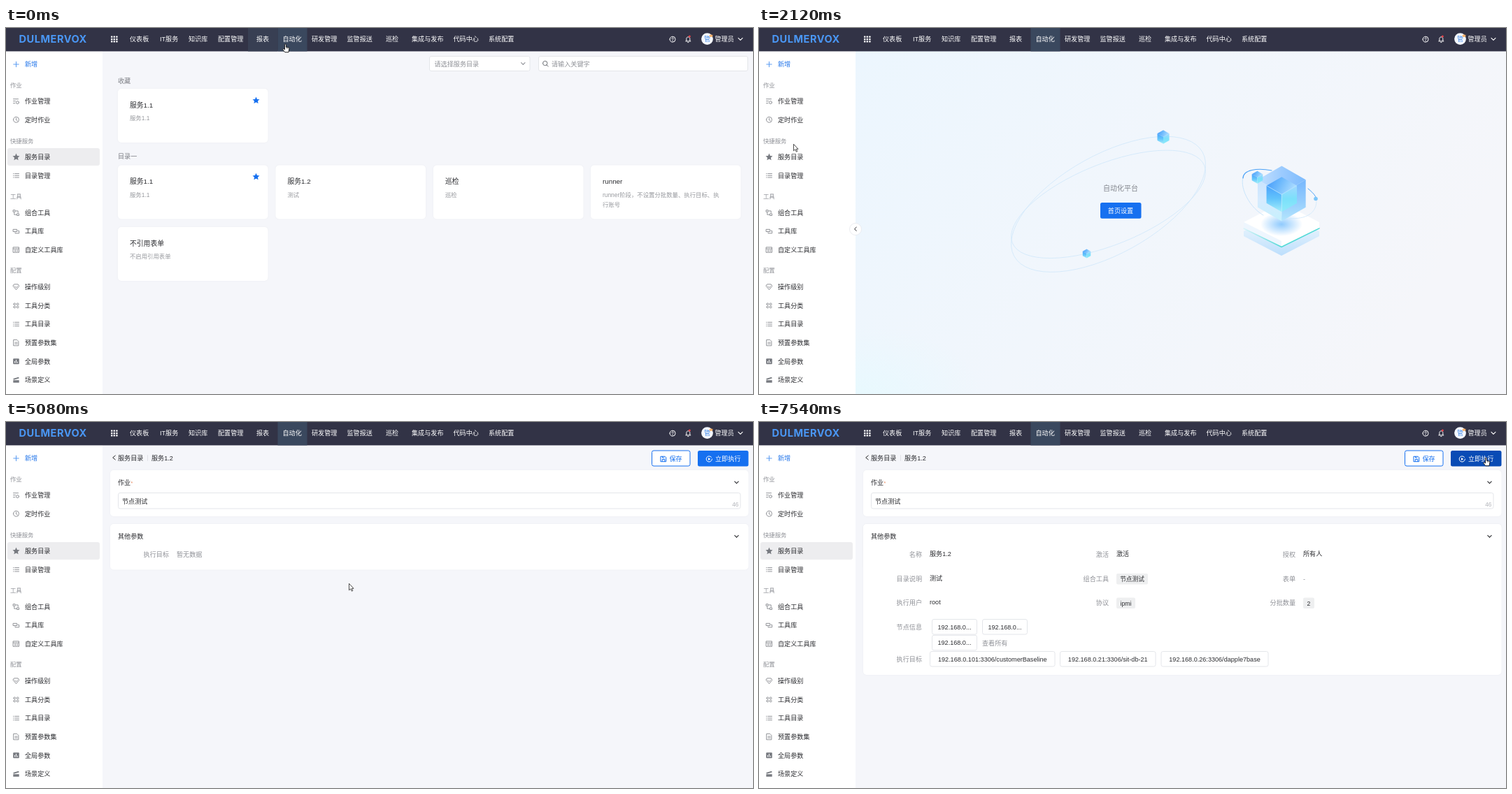
Write an HTML page that moves like this. It is 1068 px wide and 524 px high and loops after 8000 ms.

```html
<!DOCTYPE html>
<html>
<head>
<meta charset="utf-8">
<title>Service catalog</title>
<style>
html, body { margin: 0; width: 100%; height: 100%; overflow: hidden; background: #f5f6fa; }
svg { display: block; width: 100%; height: 100%; }
text { font-family: "Liberation Sans", "Noto Sans CJK SC", "Noto Sans CJK", sans-serif; white-space: pre; }
.brand { font-family: Inter, sans-serif; font-weight: 700; letter-spacing: .5px; }
.line { fill: none; stroke-linecap: round; stroke-linejoin: round; }
.card { fill: #fff; filter: drop-shadow(0 0 1px #0000000a); }

.t { animation: 8s step-end infinite; }
.nav { animation-name: nav; animation-timing-function: linear; }
.home { animation-name: home; }
.selected { animation-name: selected; }
.row1 { animation-name: row1; }
.row2 { animation-name: row2; }
.fold { animation-name: fold; }
.catalog { animation-name: catalog; }
.fav { animation-name: fav; }
.job { animation-name: job; }
.body { animation-name: body; }
.empty { animation-name: empty; }
.fields { animation-name: fields; }
.targets { animation-name: targets; }
.run { animation-name: run; }
.cursor { animation-name: cursor; }
.hand { animation-name: hand; }
.arrow { animation-name: arrow; }

@keyframes nav { 0%, .87% { opacity: 1 } 3%, 100% { opacity: 0 } }
@keyframes home { 0%, 35.87% { opacity: 0 } 1.75% { opacity: 1 } }
@keyframes selected { 0%, 35.87% { opacity: 1 } 1.75% { opacity: 0 } 27.45% { opacity: .6 } }
@keyframes row1 { 0%, 24.5% { opacity: 0 } 21.67% { opacity: .6 } }
@keyframes row2 { 0%, 25.5% { opacity: 0 } 24.5% { opacity: .6 } }
@keyframes fold { 0%, 50.6% { opacity: 0 } 20.72% { opacity: 1 } }
@keyframes catalog { 0%, 38% { opacity: 1 } 1.75%, 59.5% { opacity: 0 } }
@keyframes fav { 0% { opacity: 0 } 56.4% { opacity: 1 } }
@keyframes job { 0% { opacity: 0 } 59.5% { opacity: 1 } }
@keyframes body { 0% { opacity: 0 } 61.37% { opacity: 1 } }
@keyframes empty { 0%, 66.37% { opacity: 0 } 61.37% { opacity: 1 } }
@keyframes fields { 0% { opacity: 0 } 66.37% { opacity: 1 } }
@keyframes targets { 0% { opacity: 0 } 67.37% { opacity: 1 } }
@keyframes run { 0% { fill: #1670f0 } 86.7% { fill: #0f5fd7 } 92.5% { fill: #0b54c6 } 94.2% { fill: #094bb5 } }
@keyframes hand { 0%, 21.67%, 27.45%, 86.7% { opacity: 1 } 15%, 25.5%, 59.5% { opacity: 0 } }
@keyframes arrow { 0%, 21.67%, 27.45%, 86.7% { opacity: 0 } 15%, 25.5%, 59.5% { opacity: 1 } }
@keyframes cursor {
  0% { transform: translate(399px, 23px) }
  13.12% { transform: translate(399px, 23px); animation-timing-function: steps(4, jump-start) }
  16.92% { transform: translate(262px, 42px); animation-timing-function: steps(7, jump-start) }
  23.55% { transform: translate(71px, 100px); animation-timing-function: steps(4, jump-start) }
  27.45% { transform: translate(49px, 166px); animation-timing-function: steps(4, jump-start) }
  31.3% { transform: translate(43px, 186px) }
  48.75% { transform: translate(43px, 186px); animation-timing-function: steps(3, jump-start) }
  51.64% { transform: translate(150px, 190px); animation-timing-function: steps(5, jump-start) }
  56.45% { transform: translate(400px, 222px); animation-timing-function: steps(3, jump-start) }
  59.34% { transform: translate(490px, 231px) }
  76.98% { transform: translate(490px, 231px); animation-timing-function: steps(1, jump-start) }
  77.97% { transform: translate(511px, 215px); animation-timing-function: steps(3, jump-start) }
  80.9% { transform: translate(650px, 152px); animation-timing-function: steps(4, jump-start) }
  84.8% { transform: translate(905px, 82px); animation-timing-function: steps(3, jump-start) }
  87.6% { transform: translate(1039px, 49px) }
  87.62%, 100% { transform: translate(1039px, 51px) }
}
</style>
</head>
<body>
<script>
const DARK = '#2c2d31', GREY = '#8f9197', BLUE = '#1670f0';
const STAR = 'M0-5L1.5-1.6 5-1.3 2.4 1.1 3.1 4.6 0 2.8-3.1 4.6-2.4 1.1-5-1.3-1.5-1.6Z';

// y is the middle of the text line
const text = (x, y, s, fill = DARK, size = 9.1, anchor = 'start') =>
  `<text x="${x}" y="${(y + size * .365).toFixed(2)}" fill="${fill}" font-size="${size}" text-anchor="${anchor}">${s}</text>`;
const rect = (x, y, w, h, r, attrs) =>
  `<rect x="${x}" y="${y}" width="${w}" height="${h}" rx="${r}" ${attrs}/>`;
const card = (x, y, w, h) => rect(x, y, w, h, 5, 'class="card"');
const box = (x, y, w, h) => rect(x + .5, y + .5, w - 1, h - 1, 2.5, 'fill="#fff" stroke="#e4e6ea"');
const line = (x, y, d, stroke, width = 1) =>
  `<path class="line" transform="translate(${x} ${y})" d="${d}" stroke="${stroke}" stroke-width="${width}"/>`;
const shape = (x, y, d, fill) => `<path transform="translate(${x} ${y})" d="${d}" fill="${fill}"/>`;
const group = (name, ...parts) => `<g class="t ${name}">${parts.join('')}</g>`;
const down = (x, y, stroke, r = 2.7) => line(x, y, `M${-r}${-r / 2}L0 ${r / 2}L${r}${-r / 2}`, stroke, 1.1);
const ring = r => `M${-r} 0a${r} ${r} 0 1 1 ${2 * r} 0a${r} ${r} 0 1 1 ${-2 * r} 0`;
const cube = (x, y, r, look = '') => `<g transform="translate(${x} ${y}) scale(${r})">
  <path d="M0-1L.87-.5 0 0-.87-.5Z" fill="url(#${look}top)"/>
  <path d="M-.87-.5L0 0V1L-.87 .5Z" fill="url(#${look}left)"/>
  <path d="M.87-.5L0 0V1L.87 .5Z" fill="url(#${look}right)"/></g>`;

function header() {
  const menu = [[177, '仪表板'], [220, 'IT服务'], [261, '知识库'], [303, '配置管理'], [358, '报表'], [395.5, '自动化'],
    [437, '研发管理'], [487.5, '监管报送'], [543, '巡检'], [580, '集成与发布'], [639.5, '代码中心'], [690, '系统配置']];
  let dots = '';
  for (let i = 0; i < 9; i++) dots += rect(150 + i % 3 * 3.6, 11.5 + (i / 3 | 0) * 3.4, 2.4, 2.3, .3, 'fill="#fff"');
  return rect(0, 0, 1068, 33.4, 0, 'fill="#323346"') +
    group('nav', rect(346, 0, 42, 33.4, 0, 'fill="#383f53"')) +
    rect(388.5, 0, 42, 33.4, 0, 'fill="#3a485e"') +
    '<text class="brand" x="18.5" y="21" font-size="14.6" fill="#4a97f5">DULMERVOX</text>' + dots +
    menu.map(([x, s]) => text(x, 16, s, '#fff')).join('') +
    line(953, 16.2, ring(4) + 'M-1.3-.9C-1.3-2.7 1.4-2.5 1.3-.9C1.2-.1 0-.1 0 .9M0 2.2v.1', '#fff') +
    line(975.3, 16.3, 'M-3.5 2.6h7M-2.5 2.4V-.8C-2.5-4.3 2.5-4.3 2.5-.8V2.4M-.6 4.3h1.2', '#fff') +
    '<circle cx="977.3" cy="12" r="1.6" fill="#e8454c"/><circle cx="1002.5" cy="15.6" r="8.4" fill="#f4f8ff"/>' +
    text(1002.5, 15.8, '管', '#4b8fe8', 9.1, 'middle') +
    shape(1008, 11, 'M-2.6-1.6L-1-.7 0-2.4 1-.7 2.6-1.6 2 1.8H-2Z', '#f5b06a') +
    text(1013.5, 16, '管理员', '#fff') + down(1050, 15.8, '#fff', 3);
}

function sidebar() {
  const list = 'M-4-2.7h.5M-4 0h.5M-4 2.7h.5M-1.8-2.7H4M-1.8 0H4M-1.8 2.7H4';
  const items = [
    [105, '作业管理', 'M-4-3.3H3M-4-.4h3M-4 2.6h2.4M4 1.6a2 2 0 1 1-4 0a2 2 0 1 1 4 0'],
    [131.3, '定时作业', ring(4) + 'M0-2.2V.3L1.6 1.4'],
    [184.6, '服务目录'],
    [211.3, '目录管理', list],
    [264.5, '组合工具', 'M-4-3.8h2.6v2.6H-4ZM1.5 1.4h2.6V4H1.5ZM-.2-2.6H2.7V0M-2.7 0v2.7H.2'],
    [291, '工具库', 'M-4-2.7h5.2V.5H-4ZM-1.5 1.9v1h5.7V-.6H2.5'],
    [317.6, '自定义工具库', 'M-4-3.7h8v7.4h-8ZM-4-1.5h8M-2 .3h1.3M-2 1.9h1.3M1.2.3h1M1.2 1.9h1'],
    [370.7, '操作级别', 'M-2.6-3.8h5.2L4.3-1.2 0 4-4.3-1.2ZM-2-1L0 1.2 2-1'],
    [397.4, '工具分类', [[-2.2, -2.1], [2.2, -2.1], [-2.2, 2.1], [2.2, 2.1]]
      .map(([x, y]) => `M${x - 1.4} ${y}a1.4 1.4 0 1 1 2.8 0a1.4 1.4 0 1 1-2.8 0`).join('')],
    [424, '工具目录', list],
    [450.6, '预置参数集', 'M-3.4-4.2H1.2L3.4-2V4.2H-3.4ZM-1.7-.5h3.4M-1.7 1.6h3.4'],
    [477.3, '全局参数'],
    [503.7, '场景定义']];
  const labels = [[82, '作业'], [161.5, '快捷服务'], [241, '工具'], [347.3, '配置']];
  const row = y => rect(2, y, 132, 25, 3, 'fill="#ededef"');
  return rect(0, 33, 138, 491, 0, 'fill="#fff"') +
    group('selected', row(172)) + group('row1', row(92.5)) + group('row2', row(119)) +
    line(14.5, 52, 'M-3.7 0h7.4M0-3.7v7.4', '#5a9bf2') + text(27, 52, '新增', '#2476ea') +
    labels.map(([y, s]) => text(6, y, s, GREY, 8.4)).join('') +
    items.map(([y, s, d]) => text(27, y, s) + (d ? line(14.5, y, d, '#85878d', .9) : '')).join('') +
    shape(14.5, 184.6, STAR, '#777a80') +
    rect(10.2, 473.3, 8.6, 8, 1, 'fill="#777a80"') + line(14.5, 477.3, 'M-2 1.9V0M0 1.9V-2M2 1.9V.8', '#fff') +
    shape(14.5, 503.7, 'M-4.2-1.8L3.6-4 4.2-2.2-3.6 0ZM-4.2.5h8.4v3.6h-8.4Z', '#777a80');
}

function home() {
  const orbit = (a, b, r) =>
    `<ellipse rx="${a}" ry="${b}" transform="translate(499.5 252.3) rotate(${-r})" fill="none" stroke="#d3e9fb" stroke-width=".8"/>`;
  return group('home',
    rect(138, 33, 930, 491, 0, 'fill="url(#sky)"'), rect(138, 33, 930, 491, 0, 'fill="url(#mint)"'),
    orbit(153.9, 71, 29), orbit(148, 58, 22),
    cube(578, 156, 9.8), cube(468.5, 323, 6.6),
    text(517, 229, '自动化平台', '#84878e', 10, 'middle'),
    rect(488, 250, 58.5, 22.8, 2.5, `fill="${BLUE}"`), text(517, 261.5, '首页设置', '#fff', 9.1, 'middle'),
    // pedestal
    shape(747, 298, 'M-54-7L0-35 54-7V0L0 28-54 0Z', 'url(#base)'),
    shape(747, 286, 'M-54-8L0-36 54-8V1L0 28-54 1Z', '#fff'),
    shape(747, 286, 'M-54-8V1L0 28V19Z', '#eef6fe'),
    line(747, 286, 'M-54 1L0 27.5 54 .8', 'url(#edge)', 1.5),
    '<ellipse cx="747" cy="281" rx="30" ry="17" fill="url(#glow)"/>',
    // ring and cubes
    line(747, 238, 'M-26 30C-50 16-63-18-52-30', '#c4e2fb', .9),
    line(747, 238, 'M-55-23C-55-35-35-38-14-34', '#4da3f7', 1.2),
    line(747, 238, 'M38-8C44-3 48 1 50 6', '#4da3f7', 1),
    line(747, 238, 'M50 10C50 30 30 37 8 34', '#d0e9fc', .8),
    cube(747.3, 237, 39.5, 'shell-'),
    cube(747.3, 238.3, 25),
    line(747.3, 238.3, 'M-21-12.3L0 0 21-12.3M0 0V24', '#c9f0ff', .6),
    cube(712.5, 213.7, 9),
    '<circle cx="796" cy="244.5" r="2.8" fill="#7cc6fa"/>');
}

function catalog() {
  const cards = [[160, 87, '服务1.1', '服务1.1'], [160, 196.5, '服务1.1', '服务1.1'], [385.5, 196.5, '服务1.2', '测试'],
    [611, 196.5, '巡检', '巡检'], [836, 196.5, 'runner', 'runner阶段，不设置分批数量、执行目标、执'],
    [160, 285, '不引用表单', '不启用引用表单']];
  return group('catalog',
    box(605, 40, 144.5, 22), text(612.5, 51.3, '请选择服务目录', GREY), down(739.3, 51, GREY),
    box(761, 40, 300, 22), line(770.7, 50.5, ring(3.2) + 'M2.4 2.4L4.6 4.6', '#6d7076'), text(780, 51.3, '请输入关键字', GREY),
    text(160, 75.3, '收藏', '#7b7d83'), text(160, 183.5, '目录一', '#7b7d83'),
    ...cards.map(([x, y, title, note]) => card(x, y, 214.5, 77) +
      text(x + 17, y + 23.3, title, DARK, 9.8) + text(x + 17, y + 42.2, note, '#97999e', 8.4)),
    text(853, 252.7, '行账号', '#97999e', 8.4),
    shape(357.5, 103.5, STAR, BLUE), shape(357.5, 212.7, STAR, BLUE),
    group('fav', line(583, 212.7, STAR, GREY, .9)));
}

function job() {
  const label = (x, y, s) => text(x, y, s, GREY, 9.1, 'end');
  const tag = (x, y, w, s) => rect(x, y, w, 15.5, 2, 'fill="#eeeff0"') + text(x + w / 2, y + 8, s, DARK, 8.7, 'middle');
  const chip = (x, y, w, s) => box(x, y, w, 22.5) + text(x + w / 2, y + 11.2, s, DARK, 9.1, 'middle');
  const node = (x, y) => chip(x, y, 65, '192.168.0...');
  return group('job',
    line(154.5, 51, 'M1.8-3L-1.8 0 1.8 3', DARK), text(160, 51.5, '服务目录'),
    line(202.5, 51.5, 'M0-4V4', '#dcdee2', .8), text(208, 51.5, '服务1.2'),
    rect(923.5, 41, 54.5, 22, 2.5, `fill="#fff" stroke="${BLUE}"`),
    line(940, 53, 'M-3.7-3.7H2.2L3.7-2.2V3.7H-3.7ZM-1.8 3.5V.5H1.8V3.5M-1.5-3.5V-1.8H1', BLUE),
    text(948.5, 52.3, '保存', BLUE),
    rect(989, 41, 72.5, 22.5, 2.5, 'class="t run"'),
    line(1005.3, 53, 'M3.2-2.6A4.1 4.1 0 1 0 4.1 0', '#fff'), shape(1005.3, 53, 'M-1.3-2L2 0-1.3 2Z', '#fff'),
    text(1014, 52.3, '立即执行', '#fff'),
    card(149, 69, 912.5, 66), card(149, 146, 912.5, 65.5),
    group('body',
      text(160, 86.2, '作业'), text(178.6, 87.2, '*', '#e8855a', 7),
      down(1044.5, 86.5, DARK), box(160, 101, 890.5, 23.5),
      text(166, 113.3, '节点测试'), text(1047.5, 117.7, '46', '#b4b6bb', 8.4, 'end')),
    group('empty', label(233, 190, '执行目标'), text(244, 190, '暂无数据', GREY)),
    group('fields',
      card(149, 146, 912.5, 216),
      label(233, 190, '名称'), text(244, 189, '服务1.2'),
      label(500, 190, '激活'), text(511, 189, '激活'),
      label(767, 190, '授权'), text(778, 189, '所有人'),
      label(233, 224.3, '目录说明'), text(244, 223.5, '测试'),
      label(500, 224.3, '组合工具'), tag(511, 217, 45, '节点测试'),
      label(767, 224.3, '表单'), text(778, 225, '-', GREY),
      label(233, 259, '执行用户'), text(244, 258, 'root'),
      label(500, 259, '协议'), tag(511, 251.5, 27, 'ipmi'),
      label(767, 259, '分批数量'), tag(778, 251.5, 16, '2')),
    group('targets',
      label(233, 293.7, '节点信息'), node(247, 282), node(319, 282), node(247, 304.8),
      text(319, 316.5, '查看所有', GREY), label(233, 340, '执行目标'),
      chip(244, 328, 179.5, '192.168.0.101:3306/customerBaseline'),
      chip(430, 328, 137.5, '192.168.0.21:3306/sit-db-21'),
      chip(574.5, 328, 154, '192.168.0.26:3306/dapple7base')),
    group('body', text(160, 163.7, '其他参数'), down(1044.5, 163.7, DARK)));
}

const fold = () => group('fold',
  '<circle cx="138" cy="288" r="8.5" fill="#fff" stroke="#e6e8ec" stroke-width=".8"/>',
  line(138, 287.8, 'M1.3-2.6L-1.5 0 1.3 2.6', DARK));

const cursor = () => group('cursor',
  group('arrow', '<path d="M.5.3V9.8L2.8 7.8 4.3 11.2 5.8 10.5 4.3 7.3H7Z" fill="#fff" stroke="#222" stroke-width=".8"/>'),
  group('hand', `<path d="M-.5 1C-.5-.2 1.4-.2 1.4 1V4.3L4.8 5C5.7 5.2 6 5.7 5.9 6.6L5 11.7H-.2L-3 8.2
    C-3.8 7.2-2.6 6.2-1.6 7L-.5 8Z" fill="#fff" stroke="#111" stroke-width=".9" stroke-linejoin="round"/>
    <path d="M2.3 5V6.8M3.9 5.3V6.9" stroke="#111" stroke-width=".5"/>`));

const gradient = (id, dir, ...stops) => `<linearGradient id="${id}" ${dir}>` +
  stops.map((c, i) => `<stop offset="${i / (stops.length - 1)}" stop-color="${c}"/>`).join('') + '</linearGradient>';
const radial = (id, pos, color) => `<radialGradient id="${id}" ${pos}><stop stop-color="${color}"/>
  <stop offset="1" stop-color="${color}" stop-opacity="0"/></radialGradient>`;
const vertical = 'x2="0" y2="1"';

document.body.innerHTML = `<svg viewBox="0 0 1068 524" preserveAspectRatio="none"><defs>
  ${gradient('sky', 'x2="1" y2=".35"', '#ecf6fe', '#f1f6fc', '#f5f6fa')}
  ${radial('mint', 'cx="0" cy="1" r=".2"', '#e8f9fe')}
  ${gradient('top', 'x2="1" y2=".3"', '#3f96fb', '#6db9fc', '#a9daff')}
  ${gradient('left', vertical, '#4ba2fc', '#62c4fb', '#a5eefb')}
  ${gradient('right', vertical, '#a2d8ff', '#7be0fa', '#8fe9fa')}
  ${gradient('shell-top', 'x2="1" y2="0"', '#c3e0fe', '#9ccbfe', '#7dbbfd')}
  ${gradient('shell-left', vertical, '#c9e3fe', '#d6ebfe', '#c5f0fd')}
  ${gradient('shell-right', vertical, '#76b7fd', '#93cbfd', '#b4e6fd')}
  ${gradient('base', vertical, '#eef6fe', '#dceefd', '#bcdefc')}
  ${gradient('edge', 'x2="1" y2="0"', '#d9f3fa', '#4fd9d6', '#4fd9d6')}
  ${radial('glow', 'r=".5"', '#8fcafd')}
  </defs>${catalog()}${home()}${job()}${sidebar()}${header()}${fold()}${cursor()}</svg>`;
</script>
</body>
</html>
```
